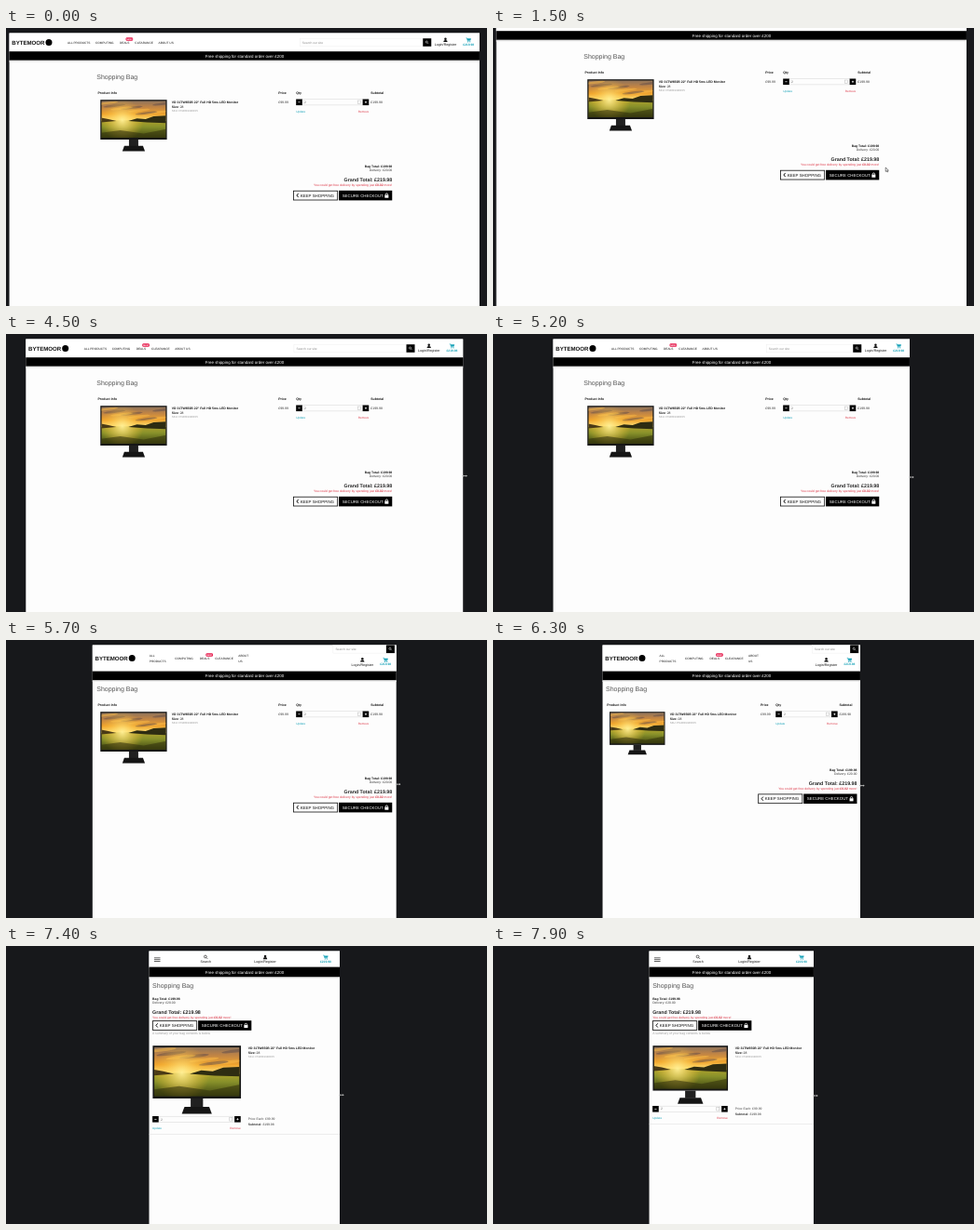
Animation, 516 px wide and 299 px high, one loop 8 s. Source, as an HTML page with a canvas:

```html
<!DOCTYPE html>
<html lang="en">
<head>
<meta charset="utf-8">
<title>Shopping bag</title>
<style>
  html, body { margin: 0; width: 516px; height: 299px; overflow: hidden; background: #17181b; }
  canvas { display: block; }
</style>
</head>
<body>
<canvas id="stage" width="516" height="299"></canvas>
<script>
const ctx = document.getElementById('stage').getContext('2d');
const LOOP = 8000, STEP = 100, MID = 255.75, TOP = 5.5;
const DARK = '#17181b', INK = '#111', GREY = '#999', RED = '#dc3545', CYAN = '#17a2b8';

// time, half width of the window
const WIDTH = [[0, 252.2], [4200, 252.2], [5100, 199], [5200, 191.2], [6000, 146],
  [6300, 138.2], [6900, 116.3], [7800, 91], [7900, 88.2]];
// time, scroll offset
const SCROLL = [[0, 0], [1400, 0], [1500, 22], [1600, 27.5], [1700, 28.5],
  [2200, 28.5], [2300, 6.5], [2400, 1], [2500, 0]];
// time, pointer x, pointer y
const POINTER = [[500, 459.5, 152], [900, 459.5, 152], [1000, 444, 157], [1100, 423, 160],
  [1200, 412, 158], [1300, 421.2, 150], [1800, 421.2, 150], [1900, 420.8, 149.6],
  [2900, 420.8, 149.6], [3000, 449, 146.6], [3100, 468, 145], [3200, 488, 144.4],
  [3300, 504, 146], [3400, 511, 148.5], [3500, 511, 148.5], [3600, 510, 149.5], [3700, 509, 150.5]];
const GRIP = [[3800, 152], [4200, 152], [5200, 154], [6300, 156.6], [6900, 159.5], [7900, 161]];

function at(table, t, col = 1) {
  const i = table.findIndex(row => row[0] > t);
  if (i < 0) return table[table.length - 1][col];
  if (i === 0) return table[0][col];
  const a = table[i - 1], b = table[i];
  return a[col] + (b[col] - a[col]) * (t - a[0]) / (b[0] - a[0]);
}

function rect(x, y, w, h, color) {
  ctx.fillStyle = color;
  ctx.fillRect(x, y, w, h);
}

function frame(x, y, w, h, color, line = 0.6) {
  ctx.strokeStyle = color;
  ctx.lineWidth = line;
  ctx.strokeRect(x, y, w, h);
}

function disc(x, y, r, color) {
  ctx.fillStyle = color;
  ctx.beginPath();
  ctx.arc(x, y, r, 0, 7);
  ctx.fill();
}

function path(points, color, line, closed) {
  ctx.beginPath();
  points.forEach(([x, y], i) => i ? ctx.lineTo(x, y) : ctx.moveTo(x, y));
  if (closed) ctx.closePath();
  if (line) {
    ctx.strokeStyle = color;
    ctx.lineWidth = line;
    ctx.stroke();
  } else {
    ctx.fillStyle = color;
    ctx.fill();
  }
}

// Runs are [text, bold]; y is the middle of the capitals, align 0 left, .5 centre, 1 right.
function runs(parts, x, y, size, color = INK, align = 0) {
  const font = bold => ctx.font = `${bold ? 'bold ' : ''}${size}px "Liberation Sans", Arial, sans-serif`;
  const widths = parts.map(([s, bold]) => (font(bold), ctx.measureText(s).width));
  x -= align * widths.reduce((a, b) => a + b, 0);
  ctx.fillStyle = color;
  parts.forEach(([s, bold], i) => {
    font(bold);
    ctx.fillText(s, x, y + size * 0.36);
    x += widths[i];
  });
}
const text = (s, x, y, size, color, align) => runs([[s, 0]], x, y, size, color, align);
const bold = (s, x, y, size, color, align) => runs([[s, 1]], x, y, size, color, align);

function userIcon(x, y) {
  disc(x, y - 1.1, 1.25, INK);
  ctx.beginPath();
  ctx.arc(x, y + 2.3, 2.2, Math.PI, 0);
  ctx.fill();
}

function cartIcon(x, y) {
  path([[x - 2.6, y - 2], [x - 1.7, y - 2], [x - 0.9, y + 1], [x + 2, y + 1]], CYAN, 0.7);
  path([[x - 1.5, y - 1.5], [x + 2.8, y - 1.5], [x + 2.2, y + 0.4], [x - 1, y + 0.4]], CYAN);
  disc(x - 0.6, y + 2, 0.6, CYAN);
  disc(x + 1.6, y + 2, 0.6, CYAN);
}

function searchIcon(x, y, size, color) {
  ctx.strokeStyle = color;
  ctx.lineWidth = size * 0.45;
  ctx.beginPath();
  ctx.arc(x - size * 0.25, y - size * 0.25, size, 0, 7);
  ctx.moveTo(x + size * 0.5, y + size * 0.5);
  ctx.lineTo(x + size * 1.5, y + size * 1.5);
  ctx.stroke();
}

function account(user, cart, y, gap) {
  userIcon(user, y);
  text('Login/Register', user, y + gap, 3.65, INK, 0.5);
  cartIcon(cart, y);
  bold('£219.98', cart, y + gap, 3.3, CYAN, 0.5);
}

function searchBox(x, button, y) {
  frame(x - 2.5, y - 4.3, button - x + 2.5, 8.6, '#ededed', 0.5);
  text('Search our site', x, y, 3.3, '#8a8a8a');
  rect(button, y - 4.3, 9, 8.6, '#000');
  searchIcon(button + 4.3, y - 0.2, 1.1, '#fff');
}

function banner(y, h, left, width) {
  rect(left, y, width, h, '#000');
  rect(left, y + h, width, 0.8, '#c4c4c4');
  rect(left, y + h + 0.8, width, 1, '#efefef');
  text('Free shipping for standard order over £200', MID + 0.2, y + h / 2 + 0.1, 4.45, '#fff', 0.5);
}

function deskHeader(half, left, right) {
  const wide = half > 165, k = Math.min(0, (half - 138) / 22);
  const y = wide ? 15.6 : 19.6;
  rect(left, TOP, right - left, wide ? 20 : 28, '#fff');
  bold('BYTEMOOR', left + 2.7, y, 6.1);
  if (half > 125) disc(left + 42.4, y, 3.5, '#000');
  const x = wide ? [62.5, 92.5, 118.4, 134.8, 160]
    : [61 + k * 6, 88.5 + k * 9.5, 115 + k * 10, 131.5 + k * 10, 156.5 + k * 9.5];
  ['ALL PRODUCTS', 'COMPUTING', 'DEALS', 'CLEARANCE', 'ABOUT US'].forEach((label, i) => {
    const words = wide ? [label] : label.split(' ');
    words.forEach((word, j) =>
      text(word, left + x[i], y + 0.1 + (j - (words.length - 1) / 2) * 5.4, 3.2));
  });
  const badge = left + x[2] + 6.6;
  ctx.fillStyle = '#e6194b';
  ctx.beginPath();
  ctx.roundRect(badge, y - 5.4, 7.6, 3.6, 1.4);
  ctx.fill();
  bold('NEW!', badge + 3.8, y - 3.6, 2.4, '#fff', 0.5);
  if (wide) {
    searchBox(right - 190 + 0.64 * (252 - half), right - 60.7, 15.5);
    account(right - 36.5, right - 11.8, 12.8, 5.2);
  } else {
    const button = right - 10.8 + k;
    searchBox(button - 24 - Math.max(0, half - 116) * 0.65, button, 9.8);
    account(right - 36.4, right - 11.6, 21.3, 5);
  }
  banner(wide ? 25.2 : 33.6, 9.6, left, right - left);
}

function phoneHeader(left, right) {
  const w = right - left;
  rect(left, TOP, w, 18, '#fff');
  for (let i = 0; i < 3; i++) rect(left + 5.4, 12.5 + i * 1.9, 6.6, 0.7, '#222');
  searchIcon(left + w * 0.297, 11.8, 1.4, INK);
  text('Search', left + w * 0.297, 17, 3.6, INK, 0.5);
  account(left + w * 0.609, left + w * 0.926, 12, 5);
  banner(22.6, 10.8, left, w);
}

// Screen with a sunset meadow, drawn in a box one unit wide.
function monitor(x, y, w) {
  ctx.save();
  ctx.translate(x, y);
  ctx.scale(w, w);
  rect(0, 0, 1, 0.6, '#161616');
  ctx.beginPath();
  ctx.rect(0.018, 0.018, 0.964, 0.555);
  ctx.clip();
  const sky = ctx.createLinearGradient(0, 0, 0, 0.31);
  [[0, '#85705f'], [0.35, '#c08445'], [0.7, '#f0a42e'], [1, '#ffe27a']]
    .forEach(([p, c]) => sky.addColorStop(p, c));
  rect(0, 0, 1, 0.32, sky);
  for (let i = 0; i < 8; i++) {
    ctx.fillStyle = i % 2 ? 'rgba(95,75,75,.5)' : 'rgba(255,190,70,.5)';
    ctx.beginPath();
    ctx.ellipse((i * 0.37 + 0.1) % 1, 0.05 + (i * 0.07) % 0.17, 0.17, 0.018, -0.12, 0, 7);
    ctx.fill();
  }
  const field = ctx.createLinearGradient(0, 0.3, 0, 0.58);
  [[0, '#b5a52e'], [0.4, '#87902a'], [1, '#39400f']].forEach(([p, c]) => field.addColorStop(p, c));
  rect(0, 0.31, 1, 0.3, field);
  const glow = ctx.createRadialGradient(0.33, 0.31, 0, 0.33, 0.31, 0.32);
  glow.addColorStop(0, 'rgba(255,240,150,.95)');
  glow.addColorStop(1, 'rgba(255,190,40,0)');
  rect(0, 0, 1, 0.6, glow);
  path([[0.42, 0.32], [0.55, 0.28], [0.68, 0.29], [0.8, 0.25], [1, 0.24], [1, 0.35], [0.7, 0.34]], '#2e2c12');
  path([[0, 0.27], [0.12, 0.29], [0.24, 0.32], [0, 0.34]], '#4a3a16');
  path([[0, 0.5], [0.3, 0.46], [0.65, 0.51], [1, 0.44], [1, 0.6], [0, 0.6]], 'rgba(50,48,12,.55)');
  ctx.restore();
  rect(x + w * 0.43, y + w * 0.6, w * 0.14, w * 0.1, '#202020');
  path([[x + w * 0.36, y + w * 0.695], [x + w * 0.64, y + w * 0.695],
    [x + w * 0.67, y + w * 0.775], [x + w * 0.33, y + w * 0.775]], '#151515', 0, true);
}

function product(x, y) {
  bold('VD 31TW650B 22" Full HD 5ms LED Monitor', x, y, 3.43);
  runs([['Size:', 1], [' 28', 0]], x, y + 5.1, 3.4);
  text('SKU: PN4001340155', x, y + 9.8, 2.95, GREY);
}

function quantity(x, end, y) {
  frame(x + 6.5, y - 3.1, end - x - 13, 6.2, '#d5d5d5', 0.5);
  rect(x, y - 3.3, 6.6, 6.6, '#000');
  rect(end - 6.6, y - 3.3, 6.6, 6.6, '#000');
  rect(x + 2.2, y - 0.35, 2.2, 0.7, '#fff');
  rect(end - 4.4, y - 0.35, 2.2, 0.7, '#fff');
  rect(end - 3.65, y - 1.1, 0.7, 2.2, '#fff');
  text('2', x + 8.8, y, 3.4, '#666');
  frame(end - 12, y - 1.8, 3, 3.6, '#bbb', 0.5);
  text('Update', x, y + 10, 3.1, CYAN);
  text('Remove', end, y + 10, 3.1, RED, 1);
}

function totals(x, y, align) {
  bold('Bag Total: £199.98', x, y, 3.4, INK, align);
  text('Delivery: £20.00', x, y + 4, 3.4, '#333', align);
  bold('Grand Total: £219.98', x, y + 13.9, 5.3, '#222', align);
  runs([['You could get free delivery by spending just ', 0], ['£0.02', 1], [' more!', 0]],
    x, y + 19.8, 3.4, RED, align);
}

function buttons(x, y) {
  frame(x + 0.4, y + 0.4, 47.2, 9.8, '#111', 0.8);
  path([[x + 5.6, y + 3.1], [x + 3.8, y + 5.2], [x + 5.6, y + 7.3]], INK, 1);
  text('KEEP SHOPPING', x + 7.6, y + 5.3, 4.45);
  rect(x + 49, y, 57.2, 10.6, '#000');
  text('SECURE CHECKOUT', x + 52.6, y + 5.3, 4.4, '#fff');
  rect(x + 98.3, y + 4.8, 4, 3.1, '#fff');
  ctx.strokeStyle = '#fff';
  ctx.lineWidth = 0.8;
  ctx.beginPath();
  ctx.arc(x + 100.3, y + 4.3, 1.2, Math.PI, 0);
  ctx.lineTo(x + 101.5, y + 5);
  ctx.moveTo(x + 99.1, y + 4.3);
  ctx.lineTo(x + 99.1, y + 5);
  ctx.stroke();
}

function deskBag(half) {
  const inner = Math.min(158.5, half - 3.5), x = MID - inner, w = inner * 2, end = x + w;
  const image = w / 4 - 7.9, price = x + w * 0.61 + 1.6;
  const qty = x + w * 2 / 3 + 2.6, sub = x + w * 11 / 12 + 3.4;
  const sum = 93.2 + image * 0.785;
  text('Shopping Bag', x, 52.6, 7, '#555');
  [['Product Info', x + 1.2], ['Price', price], ['Qty', qty], ['Subtotal', sub]]
    .forEach(([label, left]) => bold(label, left, 69.3, 3.5));
  monitor(x + 4, 77.2, image);
  product(x + w / 4 + 1.3, 79.3);
  text('£99.99', price, 79.4, 3.5, '#333');
  quantity(qty, x + w * 0.912 + 2.9, 79.8);
  text('£199.98', sub, 79.4, 3.5, '#333');
  totals(end, sum, 1);
  buttons(end - 106.2, sum + 25.6);
}

function phoneBag(half) {
  const x = MID - half + 3.6, w = half * 2 - 7.2;
  const image = w / 2 - 4, side = x + w / 2 + 4, qty = 107.2 + image * 0.785 + 4.8;
  text('Shopping Bag', x, 42.3, 7, '#555');
  totals(x, 57, 0);
  buttons(x, 80.2);
  text('A summary of your bag contents is below', x, 93.6, 3.4, GREY);
  monitor(x + 0.3, 107.2, image);
  product(side, 109.3);
  quantity(x, x + image, qty);
  text('Price Each: £99.99', side, qty - 0.4, 3.4, '#444');
  runs([['Subtotal:', 1], [' £199.98', 0]], side, qty + 5.1, 3.4, '#333');
  rect(x - 3.6, qty + 16, w + 7.2, 0.5, '#dcdcdc');
}

function pointer(t, right) {
  if (t < 500) return;
  if (t < 3800) {
    const x = at(POINTER, t), y = at(POINTER, t, 2);
    const arrow = [[0, 0], [0, 4.4], [1, 3.5], [1.8, 5], [2.5, 4.7], [1.8, 3.2], [3.1, 3.1]]
      .map(([dx, dy]) => [x + dx, y + dy]);
    path(arrow, '#fff', 0, true);
    path(arrow, '#333', 0.6, true);
    return;
  }
  const x = right + 1.8, y = at(GRIP, t);
  path([[x - 2.4, y], [x + 2.4, y]], '#bbb', 0.9);
  for (const d of [-1, 1])
    path([[x + d * 2.8, y], [x + d * 1.4, y - 1.1], [x + d * 1.4, y + 1.1]], '#bbb', 0, true);
}

function draw(now) {
  const t = Math.floor(now % LOOP / STEP) * STEP;
  const half = at(WIDTH, t), left = MID - half, right = MID + half, phone = half < 109;
  rect(0, 0, 516, 299, DARK);
  ctx.save();
  ctx.translate(0, -at(SCROLL, t));
  rect(left, TOP, half * 2, 340, '#fdfdfd');
  if (phone) {
    phoneHeader(left, right);
    phoneBag(half);
  } else {
    deskHeader(half, left, right);
    deskBag(half);
  }
  ctx.restore();
  pointer(t, right);
}

ctx.textRendering = 'geometricPrecision';
const start = performance.now();
(function tick() {
  draw(performance.now() - start);
  requestAnimationFrame(tick);
})();
</script>
</body>
</html>
```
